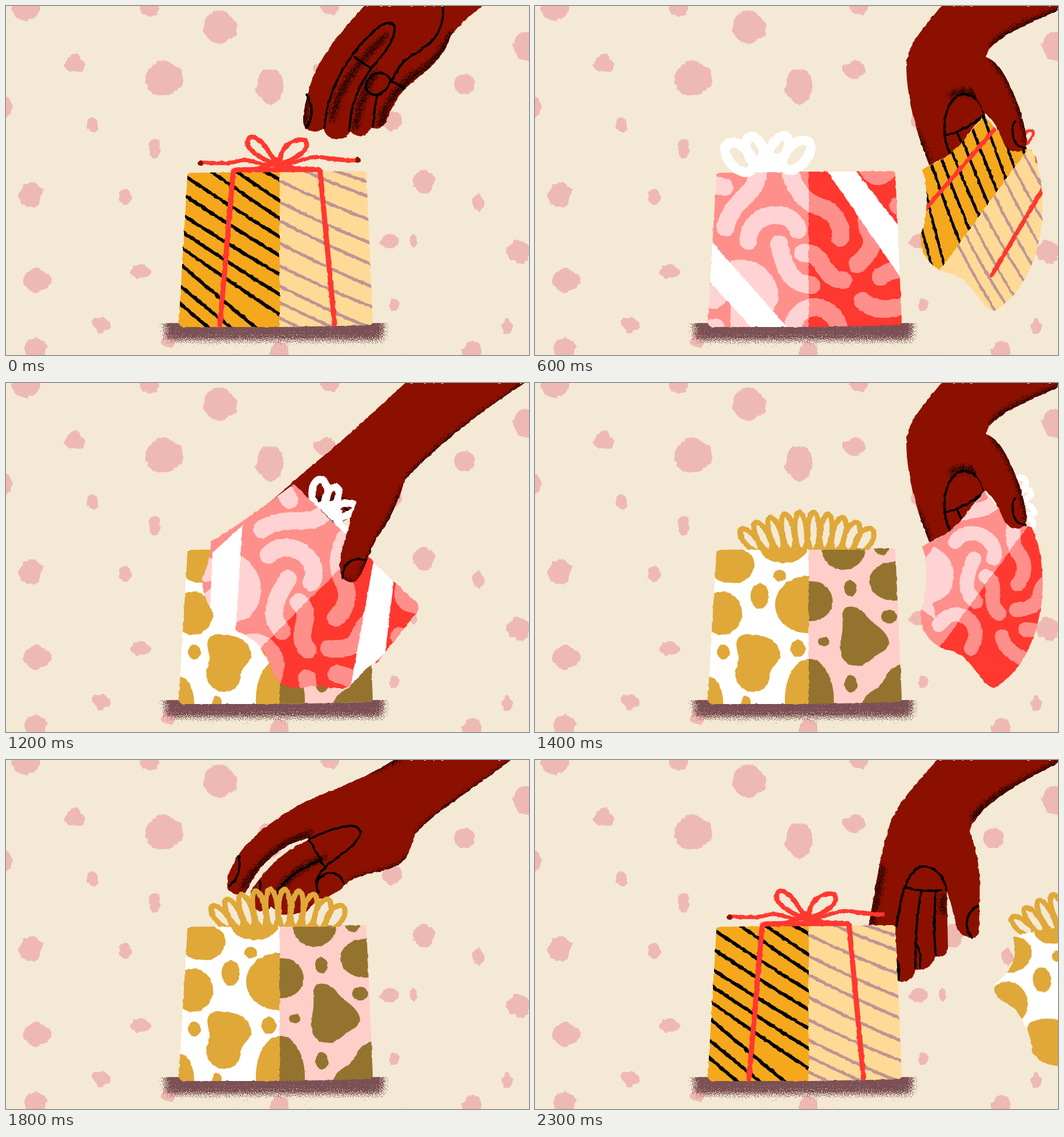
An HTML page for the animation above (2400 ms loop, 917 px wide and 611 px high).

```html
<!DOCTYPE html>
<html lang="en">
<head>
<meta charset="utf-8">
<title>Endless gift</title>
<style>
html, body { margin: 0; width: 100%; height: 100%; overflow: hidden; background: #f4e9d4; }
svg { display: block; width: 100vw; height: 100vh; }
</style>
</head>
<body>
<svg viewBox="0 0 917 611" preserveAspectRatio="none">
  <defs>
    <filter id="rough" filterUnits="userSpaceOnUse" x="0" y="0" width="917" height="611" color-interpolation-filters="sRGB">
      <feTurbulence type="fractalNoise" baseFrequency=".13" seed="4"/>
      <feDisplacementMap in="SourceGraphic" scale="4" xChannelSelector="R" yChannelSelector="G"/>
    </filter>
    <filter id="blobby" filterUnits="userSpaceOnUse" x="0" y="0" width="917" height="611" color-interpolation-filters="sRGB">
      <feTurbulence type="fractalNoise" baseFrequency=".07" numOctaves="3" seed="8"/>
      <feDisplacementMap in="SourceGraphic" scale="11" xChannelSelector="R" yChannelSelector="G"/>
    </filter>
    <filter id="grain" filterUnits="userSpaceOnUse" x="0" y="0" width="917" height="611" color-interpolation-filters="sRGB">
      <feTurbulence type="fractalNoise" baseFrequency=".85" seed="2"/>
      <feColorMatrix values="0 0 0 0 0  0 0 0 0 0  0 0 0 0 0  1 0 0 0 0" result="noise"/>
      <feGaussianBlur in="SourceGraphic" stdDeviation="7" result="soft"/>
      <feComposite in="soft" in2="noise" operator="arithmetic" k2=".6" k3="1" k4="-.8"/>
      <feComponentTransfer result="specks"><feFuncA type="linear" slope="14"/></feComponentTransfer>
      <feFlood id="ink" flood-color="#180300"/>
      <feComposite in2="specks" operator="in"/>
    </filter>
    <filter id="dust" filterUnits="userSpaceOnUse" x="230" y="530" width="480" height="81" color-interpolation-filters="sRGB">
      <feTurbulence type="fractalNoise" baseFrequency=".85" seed="5"/>
      <feColorMatrix values="0 0 0 0 0  0 0 0 0 0  0 0 0 0 0  1 0 0 0 0" result="noise"/>
      <feGaussianBlur in="SourceGraphic" stdDeviation="9" result="soft"/>
      <feComposite in="soft" in2="noise" operator="arithmetic" k2=".6" k3="1" k4="-.8"/>
      <feComponentTransfer result="specks"><feFuncA type="linear" slope="10"/></feComponentTransfer>
      <feFlood flood-color="#7b5055"/>
      <feComposite in2="specks" operator="in"/>
    </filter>
    <clipPath id="left"><path d="M0 0H480V900H0Z"/></clipPath>
    <clipPath id="right"><path d="M480 0H1100V900H480Z"/></clipPath>
    <clipPath id="floor"><path d="M0 555H917V611H0Z"/></clipPath>
    <clipPath id="low"><path d="M0 432H917V611H0Z"/></clipPath>
  </defs>
  <rect width="917" height="611" fill="#f4e9d4"/>
  <g id="dots" fill="#efb9b3" filter="url(#blobby)"></g>
  <g clip-path="url(#floor)"><rect x="277" y="530" width="387" height="57" filter="url(#dust)"/></g>
  <g id="scene" filter="url(#rough)" stroke-linecap="round" stroke-linejoin="round"></g>
</svg>
<script>
const SKIN = '#8b1000', RED = '#ff3830', PINK = '#ff8f8a', PALE = '#ffd3d3',
      GOLD = '#dfa839', OLIVE = '#94732f';
const find = id => document.getElementById(id);
const fill = (d, colour) => `<path d="${d}" fill="${colour}"/>`;
const line = (d, colour, width) => `<path d="${d}" fill="none" stroke="${colour}" stroke-width="${width}"/>`;
const oval = ([x, y, rx, ry], attrs = '') => `<ellipse cx="${x}" cy="${y}" rx="${rx}" ry="${ry}" ${attrs}/>`;
const group = (attrs, body) => `<g ${attrs}>${body}</g>`;
const half = (side, colour, body) =>
  group(`clip-path="url(#${side})"`, `<rect x="0" y="0" width="1100" height="900" fill="${colour}"/>` + body);
let clipCount = 0;
const clipped = (d, body) => {
  const id = 'clip' + clipCount++;
  return `<clipPath id="${id}"><path d="${d}"/></clipPath>` + group(`clip-path="url(#${id})"`, body);
};

const DOTS = [[35,5,23,20],[250,2,18,15],[375,37,30,28],[122,101,18,16],[277,127,33,30],[463,141,24,31],
  [569,3,17,12],[560,112,19,16],[-5,178,16,20],[152,209,11,13],[260,250,11,17],[43,331,21,21],
  [209,334,12,14],[54,480,23,21],[236,464,16,12],[167,557,15,14],[52,603,19,22],[286,585,13,12],
  [479,605,15,17],[676,201,16,18],[804,136,18,18],[915,71,27,26],[732,308,19,20],[827,343,10,15],
  [672,412,16,13],[714,411,8,12],[899,430,22,19],[680,523,8,12],[879,561,9,13],[817,605,17,19]];
find('dots').innerHTML = DOTS.map(d => oval(d)).join('');

const BOX = 'M318 299Q318 292 325 292L480 290 626 289Q632 289 632 296L643 551Q643 559 635 559L480 562 312 562Q303 562 303 553Z';

// Stripes are given by their height at the seam and their slope.
const stripes = (list, from, to, colour, width) => list.map(([y, s]) => {
  const at = x => y + (x - 480) * s, mid = (from + to) / 2;
  return line(`M${from} ${at(from)}Q${mid} ${at(mid) + 7} ${to} ${at(to)}`, colour, width);
}).join('');

const stripedArt = () =>
  half('left', '#f5a81b', stripes([[304,.6],[341,.71],[372,.71],[404,.66],[437,.65],[470,.63],[505,.66],
    [540,.7],[597,.85],[630,.82],[666,.85]], 200, 484, '#000', 6)) +
  half('right', '#ffda96', stripes([[250,.36],[269,.4],[306,.42],[343,.44],[376,.46],[415,.46],[455,.43],
    [490,.45],[519,.43],[546,.44]], 476, 680, '#bf9494', 5.5));

function stripedBow() {
  const strands = 'M476 276C450 285 430 265 410 271S375 275 341 274M480 281C510 275 530 261 555 265S590 271 617 270' +
    'M408 286Q450 288 472 274M540 285Q500 288 480 275';
  const loops = 'M472 274C455 240 432 220 425 233C416 250 445 266 474 278M479 274C482 245 505 230 524 235C538 252 505 268 479 278';
  return line(strands, RED, 7) + line(loops, RED, 8) + oval([476, 274, 12, 9], `fill="${RED}"`) +
    oval([341, 275, 5, 4.5], `fill="${SKIN}"`) + oval([617, 270, 5, 5], `fill="${SKIN}"`);
}

const RIBBON = 'M375 560L398 294Q399 287 405 287L546 286Q550 286 551 293L576 556';
const PEEL_RIBBON = 'M352 448L475 240Q478 234 488 238L600 282 602 346 583 536';

function wormArt(bands) {
  const worms = [
    'M318 314L332 317M391 285C395 330 345 335 334 388M445 280C455 330 480 345 500 352C530 360 538 390 535 406',
    'M374 411C374 360 450 350 461 392M428 417C435 450 445 480 470 486L485 489M470 432C510 430 500 478 540 480',
    'M450 575C450 512 530 512 535 575M582 370C575 400 615 410 565 452M606 474Q625 460 650 460M574 516Q600 540 650 524',
    'M582 283Q600 312 622 285M637 350L650 350'].join('');
  const marks = colour => line(worms, colour, 31) +
    fill('M343 570V446C400 435 430 480 427 515L412 545 440 570Z', colour) +
    oval([315, 561, 17, 14], `fill="${colour}"`) + oval([312, 508, 24, 22], `fill="${colour}"`);
  const bandPath = 'M510 286H560L640 388V474ZM305 407L446 567H383L302 478Z';
  return half('left', PINK, marks(PALE)) + half('right', RED, marks(PINK)) + (bands ? fill(bandPath, '#fff') : '');
}

const wormBow = () => [[358,265,18,31,-42],[386,253,14,26,-22],[427,252,14,27,28],[459,261,18,31,42]]
  .map(([x, y, rx, ry, turn]) => oval([x, y, rx, ry],
    `transform="rotate(${turn} ${x} ${y})" fill="none" stroke="#fff" stroke-width="17"`)).join('') +
  fill('M368 291L392 258H425L448 291Z', '#fff');

function spottedArt() {
  const leftSpots = [[345,319,40,32],[328,403,35,38],[436,290,41,25],[394,373,16,22],[429,337,11,10],
    [478,388,57,50],[330,471,11,13],[461,465,13,15],[304,560,26,46],[370,562,9,14],[481,555,43,72]];
  const rightSpots = [[541,288,39,39],[484,382,38,35],[608,290,13,11],[629,347,43,34],[553,359,11,14],
    [621,409,14,12],[506,453,10,8],[554,527,11,15],[481,555,43,72]];
  const spots = (list, d, colour) => group(`fill="${colour}"`, list.map(s => oval(s)).join('') + `<path d="${d}"/>`);
  return half('left', '#fff', spots(leftSpots,
      'M360 443C385 435 430 445 430 475C430 492 412 495 412 512C408 543 380 546 365 535C345 520 352 505 355 490C360 470 345 455 360 443', GOLD)) +
    half('right', '#ffcec8', spots(rightSpots,
      'M545 393C570 385 580 410 600 425C620 440 630 460 610 470C590 480 580 500 555 495C530 485 535 460 538 440C542 420 535 400 545 393' +
      'M573 565C580 535 605 540 615 515C625 495 645 490 650 492V565Z', OLIVE));
}

function spottedBow() {
  let loops = '';
  for (let i = 0; i < 10; i++) {
    const u = (i - 4.5) / 4.5, tipX = 361 + 25.5 * i, tipY = 226 + 30 * u * u, baseX = 393 + 19 * i, baseY = 294;
    const x = (tipX + baseX) / 2, y = (tipY + baseY) / 2, dx = tipX - baseX, dy = baseY - tipY;
    loops += oval([x, y, 10 + Math.max(0, i - 6), Math.hypot(dx, dy) / 2],
      `transform="rotate(${Math.atan2(dx, dy) * 180 / Math.PI} ${x} ${y})"`);
  }
  return group(`clip-path="url(#aboveBox)" fill="none" stroke="${GOLD}" stroke-width="9"`, loops);
}
document.querySelector('defs').insertAdjacentHTML('beforeend',
  '<clipPath id="aboveBox"><path d="M300 180H660V292H300Z"/></clipPath>');

const GIFTS = [
  { art: stripedArt, bow: stripedBow, ribbon: true },
  { art: wormArt, bow: wormBow },
  { art: spottedArt, bow: spottedBow }
];

const POSES = {
  hover: {
    back: 'M690 -60L628 0C590 40 545 95 533 140C523 175 518 200 523 210C532 223 548 222 557 214C560 232 580 238 597 229Q602 222 604 219C612 232 634 230 641 212C650 218 662 214 667 200C675 180 690 152 705 140C730 120 765 95 777 60C785 40 810 20 835 0L900 -60Z',
    lines: 'M558 214C562 160 590 90 650 40C665 26 685 25 681 45C675 75 650 95 640 110C612 150 604 180 602 217M766 0C770 50 740 70 715 85C690 98 686 115 676 131C668 148 655 160 640 154C622 146 632 120 653 117C665 117 672 124 675 131L699 144M651 157C645 180 645 200 643 212M612 90L638 108M527 155C538 175 540 195 526 213',
    shade: 'M572 200C580 150 610 105 668 50M612 215C618 175 636 135 650 115M656 212C662 175 690 135 725 115C755 95 772 70 782 45M525 150L522 212'
  },
  reach: {
    back: 'M780 -60L680 0C640 25 600 42 560 58C500 80 430 130 405 170C390 195 383 215 391 228C402 240 418 237 424 225C440 190 475 148 535 136L529 141C490 156 455 190 429 230C428 250 435 265 447 264Q460 265 466 256C475 272 500 275 510 268C530 270 535 255 545 245C570 240 585 228 600 214C630 192 680 200 700 172C712 155 712 140 718 130C750 90 830 45 885 0L960 -60Z',
    lines: 'M532 138C570 120 615 105 621 125C622 150 575 170 558 190C546 200 540 215 548 232M532 140L560 190M548 176C520 190 490 205 480 226M545 215C555 192 585 190 593 218M408 168C413 190 405 212 391 221M445 212Q448 225 442 235',
    shade: 'M415 225C440 180 480 145 535 128M475 235C490 205 520 185 560 170M720 130C760 85 830 50 885 5M600 216C640 195 685 205 710 165M640 20L700 -10'
  },
  grip: {
    back: 'M790 -80L700 0C650 45 600 92 560 125C520 157 480 195 446 222L545 262 575 251 606 234 690 200 699 170C750 115 830 50 910 0L1010 -70Z',
    thumb: 'M606 230C601 262 585 290 585 325C588 351 611 354 618 342C632 320 640 290 649 274C690 215 690 190 699 168L640 140Z',
    lines: 'M515 232C535 205 600 198 606 238M542 217L572 243M570 213L582 229 540 240',
    thumbLines: 'M590 342C590 312 610 305 630 310',
    shade: 'M530 212Q565 193 595 207M912 0C850 48 760 100 698 175',
    thumbShade: 'M698 180C690 215 655 260 622 340M590 342L606 352'
  },
  carry: {
    back: 'M790 -80L712 0C690 30 652 65 651 105C652 170 672 230 692 280L740 252 787 187 835 145C820 110 805 95 792 90C790 60 870 30 917 7L1010 -40V-80Z',
    thumb: 'M787 186C812 205 815 228 825 245C835 260 858 258 862 240C862 215 848 170 835 145C820 110 808 97 792 90L760 130Z',
    lines: 'M727 258C708 215 720 160 750 154C775 155 785 175 786 188M722 226Q760 215 785 192M740 222L748 238',
    thumbLines: 'M842 201C832 215 838 250 860 248',
    shade: 'M727 158Q755 140 780 160M800 70C830 40 880 25 917 8M668 220L692 280',
    thumbShade: 'M800 92C840 130 855 190 864 240'
  },
  drop: {
    back: 'M790 -80L705 0C670 40 640 70 625 105C605 160 600 210 585 290L632 292 635 385C645 393 662 388 667 367C680 368 697 365 702 343C715 348 725 340 724 325L722 230C730 250 735 275 740 295C755 316 775 316 779 300C778 260 782 220 778 190C776 160 765 135 762 125C775 80 850 40 917 5L1010 -40V-80Z',
    lines: 'M634 290C640 250 648 200 675 187C700 183 715 200 722 228M648 222Q680 232 712 228M677 230C670 270 667 300 667 365M703 230C700 270 698 300 703 342M666 320Q678 330 675 362M777 255C757 265 750 290 766 312M635 352Q640 370 637 385',
    shade: 'M610 185L590 290M716 235V270M767 105C785 70 850 40 917 5'
  }
};

const WRAPS = {
  stripedPeel: {
    edge: 'M425 215L675 313 655 556Q650 560 640 555C570 550 560 510 520 497C490 490 480 500 440 490C415 485 410 455 380 452C350 450 315 445 300 430Q285 420 275 406C300 400 320 370 330 335C350 300 395 270 415 244Q424 232 425 215Z',
    move: 'matrix(.8 .312 -.26 .89 423 217) translate(-318 -292)'
  },
  peel: {
    edge: 'M505 177L721 387Q725 394 720 402L650 490C625 495 615 530 590 535C560 535 550 525 520 533C490 538 475 525 465 500C455 470 445 450 400 432C370 425 340 375 345 340C352 325 360 300 359 277C400 255 460 210 505 177Z',
    move: 'translate(505 177) rotate(45) translate(-318 -292)',
    bowMove: 'translate(505 177) rotate(45) translate(-318 -292) translate(92 72) scale(.75)'
  },
  carry: {
    edge: 'M678 286C720 270 745 250 787 189C800 205 820 240 870 252C890 290 892 340 888 385C880 450 850 510 805 534C780 530 765 470 720 467C700 460 675 440 676 400C690 370 690 310 678 286Z',
    move: 'translate(757 172) rotate(36) scale(.82) translate(-318 -292)',
    bowMove: 'translate(838 213) rotate(82) scale(.6) translate(-408 -286)',
    plain: true
  },
  drop: {
    edge: 'M838 310C870 300 900 295 940 288V535C900 540 870 525 870 500C868 470 850 450 845 440C825 420 800 420 806 392C830 375 850 350 838 310Z',
    move: 'translate(889 385) rotate(-10) translate(-394 -373)'
  }
};

const STEPS = [
  { pose: 'hover' }, { pose: 'reach', shift: [70, -18] }, { pose: 'reach' }, { pose: 'grip', shift: [-25, 25] },
  { pose: 'grip', wrap: 'peel' }, { pose: 'carry', shift: [-62, -25], wrap: 'carry' },
  { pose: 'carry', wrap: 'carry' }, { pose: 'drop', wrap: 'drop' }
];

const skin = (outline, lines, shade) => fill(outline, SKIN) +
  clipped(outline, group('filter="url(#grain)"', line(shade, '#000', 12))) + line(lines, '#000', 3.8);

function drawBox(gift, showBow) {
  return clipped(BOX, gift.art(true)) +
    (gift.ribbon ? line(RIBBON, RED, 9) : '') + (showBow ? gift.bow() : '');
}

function drawWrap(gift, name) {
  const wrap = WRAPS[gift.ribbon && name === 'peel' ? 'stripedPeel' : name];
  const bow = group(`transform="${wrap.bowMove || wrap.move}"`, gift.bow());
  const sheet = clipped(wrap.edge, group(`transform="${wrap.move}"`,
    gift.art(!wrap.plain) + (gift.ribbon && name !== 'peel' ? line(RIBBON, RED, 9) : ''))) +
    (gift.ribbon && name === 'peel' ? line(PEEL_RIBBON, RED, 9) : '');
  return gift.ribbon && name === 'peel' ? sheet + bow : bow + sheet;
}

function drawScene(tick) {
  clipCount = 0;
  const step = STEPS[tick % 8], pose = POSES[step.pose], turn = Math.floor(tick / 8);
  const gift = GIFTS[turn], next = GIFTS[(turn + 1) % 3];
  const peeling = step.wrap === 'peel';
  const shifted = body => group(`transform="translate(${step.shift || [0, 0]})"`, body);
  let box = drawBox(step.wrap ? next : gift, !peeling);
  if (peeling && gift.ribbon) box = group('clip-path="url(#low)"', box);
  return shifted(skin(pose.back, pose.lines, pose.shade)) + box +
    (step.wrap ? shifted(drawWrap(gift, step.wrap)) : '') +
    (pose.thumb ? shifted(skin(pose.thumb, pose.thumbLines, pose.thumbShade)) : '');
}

const start = performance.now();
let shown = -1;
function render() {
  const tick = Math.floor((performance.now() - start) % 2400 / 100);
  if (tick !== shown) find('scene').innerHTML = drawScene(shown = tick);
  requestAnimationFrame(render);
}
render();
</script>
</body>
</html>
```
